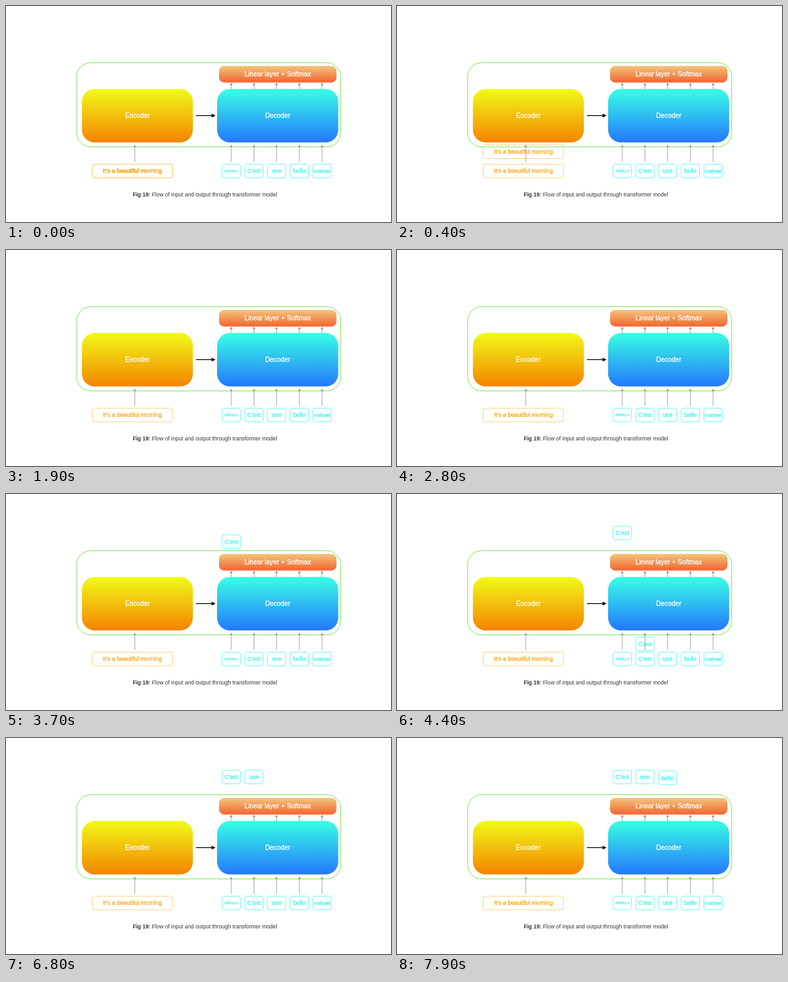
An HTML page that plays this animation: 600 by 338 pixels, repeating every 8000 ms.

```html
<!DOCTYPE html>
<html lang="en">
<head>
<meta charset="utf-8">
<title>Transformer flow</title>
<style>
  html, body { margin: 0; width: 100%; height: 100%; overflow: hidden; background: #fff; }
  svg { display: block; width: 100vw; height: 100vh; }
  text { font-family: "Liberation Sans", Arial, sans-serif; text-anchor: middle; }
  .block { font-size: 10.3px; fill: #fff; stroke: #fff; stroke-width: .3; }
  .token rect { fill: none; stroke-width: .8; }
  .token text { stroke-width: .35; }
  .caption { font-size: 8.58px; fill: #333; }
</style>
</head>
<body>
<svg viewBox="0 0 600 338">
  <defs>
    <linearGradient id="yellow" x2="0" y2="1">
      <stop stop-color="#f1fb18"/><stop offset="1" stop-color="#f48300"/>
    </linearGradient>
    <linearGradient id="blue" x2="0" y2="1">
      <stop stop-color="#38ffe3"/><stop offset="1" stop-color="#2478ff"/>
    </linearGradient>
    <linearGradient id="orange" x2="0" y2="1">
      <stop stop-color="#f3c57c"/><stop offset="1" stop-color="#f26430"/>
    </linearGradient>
  </defs>
  <rect x="110" y="88.7" width="411.7" height="131.8" rx="22" fill="none" stroke="#76e552"/>
  <g id="tokens"></g>
  <g id="arrows"></g>
  <g id="blocks"></g>
  <path d="M296 171.5H322" stroke="#000" stroke-width="1.3"/>
  <path d="M326.5 171.5L320.5 168.5V174.5Z"/>
  <text class="caption" x="310" y="298.4"><tspan font-weight="bold">Fig 19:</tspan> Flow of input and output through transformer model</text>
</svg>
<script>
const NS = "http://www.w3.org/2000/svg";
const LOOP = 8000, INPUT_Y = 258.2, OUTPUT_Y = 61;
const CYAN = "#3ff6f0", AMBER = "#f9aa1c";
const columns = [351, 386.4, 421.6, 457.2, 492.6];
const words = ["<NULL>", "C’est", "une", "belle", "matinee"];
const sizes = [6, 9.2, 9.2, 9.2, 7.3];
const sentence = "It’s a beautiful morning";

function add(parent, tag, attrs, text = "") {
  const el = document.createElementNS(NS, tag);
  for (const key in attrs) el.setAttribute(key, attrs[key]);
  el.textContent = text;
  return parent.appendChild(el);
}

const layer = id => document.getElementById(id);

function token(x, y, width, label, size, color, edge = color) {
  const g = add(layer("tokens"), "g", { class: "token", transform: `translate(${x} ${y})` });
  add(g, "rect", { x: -width / 2, y: -10.7, width, height: 21.4, rx: 3.6, stroke: edge });
  add(g, "text", { y: size * .345, "font-size": size, fill: color, stroke: color }, label);
  return g;
}

const wordToken = (i, x, y) => token(x, y, 28.6, words[i], sizes[i], CYAN);
const sentenceToken = () => token(196.9, INPUT_Y, 125, sentence, 9.15, AMBER, "#ffc566");

function arrow(x, from, to) {
  add(layer("arrows"), "path", { d: `M${x} ${from}V${to + 2}`, stroke: "#999", "stroke-width": .9 });
  add(layer("arrows"), "path", { d: `M${x} ${to}l-2.3 4h4.6Z`, fill: "#999" });
}

function block(x, y, width, height, rx, fill, label) {
  add(layer("blocks"), "rect", { x, y, width, height, rx, fill: `url(#${fill})` });
  add(layer("blocks"), "text", { class: "block", x: x + width / 2, y: y + height / 2 + 3.6 }, label);
}

block(118.3, 129.8, 173, 83.8, 20, "yellow", "Encoder");
block(329, 129.8, 188.8, 83.8, 20, "blue", "Decoder");
block(332, 93.7, 183, 26, 8, "orange", "Linear layer + Softmax");

arrow(200.8, 244, 217);
columns.forEach((x, i) => {
  arrow(x, 244, 217);
  arrow(x, 130, 120);
  wordToken(i, x, INPUT_Y);
});
sentenceToken();

// Each mover glides upward from y0 to y1 behind the blocks.
const movers = [];
function mover(el, x, y0, y1, start, duration) {
  movers.push({ el, x, y0, y1, start, duration });
}

mover(sentenceToken(), 196.9, INPUT_Y, 171, 0, 1000);
for (let i = 0; i < 3; i++) {
  const start = 2000 + 2000 * i, x = columns[i];
  mover(wordToken(i, x, INPUT_Y), x, INPUT_Y, 171, start, 1150);
  mover(wordToken(i + 1, x, OUTPUT_Y), x, OUTPUT_Y + 92, OUTPUT_Y, start + 840, 1150);
}

function draw(t) {
  for (const { el, x, y0, y1, start, duration } of movers) {
    const u = Math.min(1, Math.max(0, (t - start) / duration));
    const y = y0 + (y1 - y0) * (1 - Math.cos(Math.PI * u)) / 2;
    el.setAttribute("transform", `translate(${x} ${y})`);
    el.setAttribute("visibility", u > 0 ? "visible" : "hidden");
  }
}

const origin = performance.now();
function tick() {
  draw((performance.now() - origin) % LOOP);
  requestAnimationFrame(tick);
}
tick();
</script>
</body>
</html>
```
